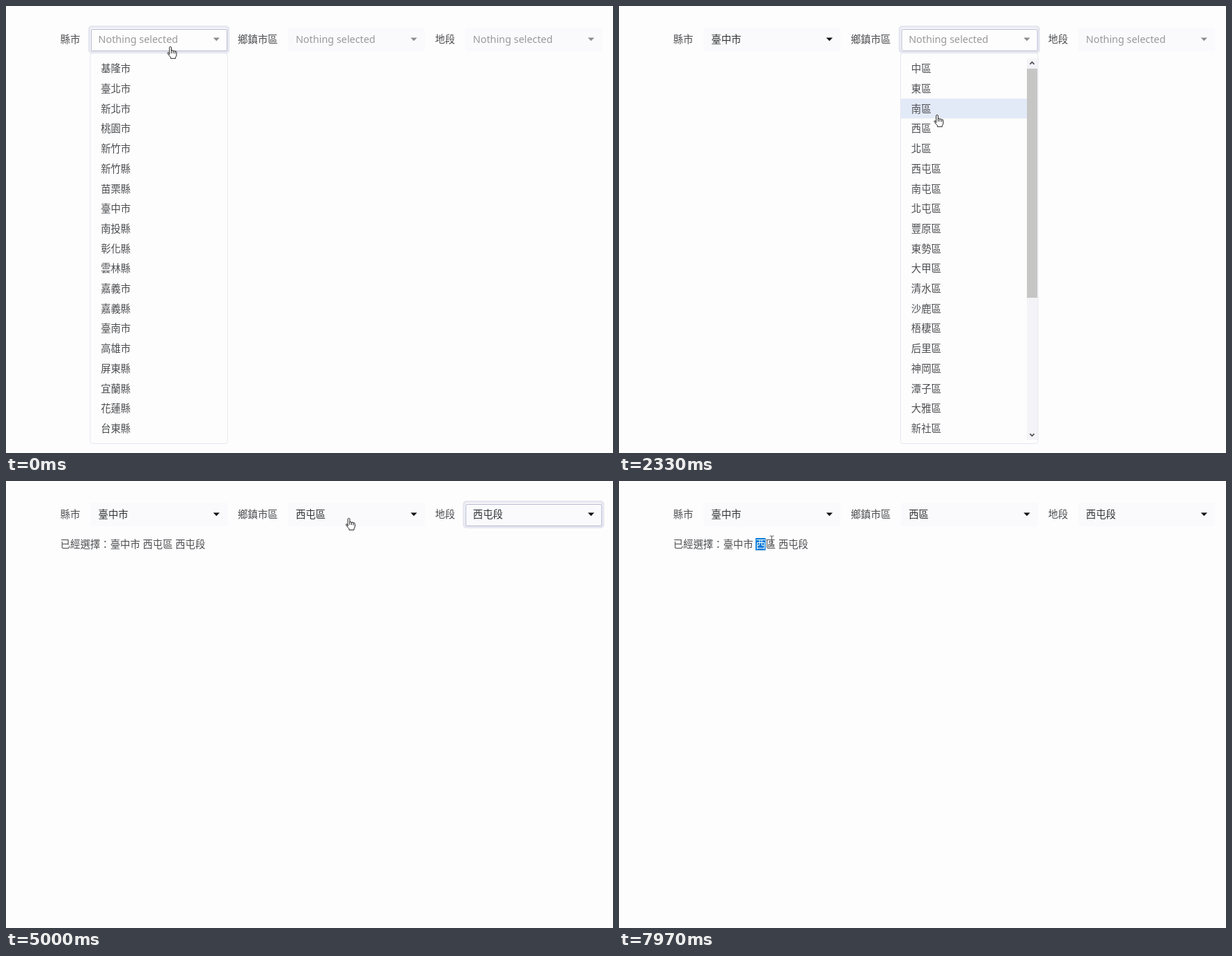
An HTML page that plays this animation: 872x642 px, repeating every 8000 ms.

```html
<!DOCTYPE html>
<html lang="zh-Hant">
<head>
<meta charset="utf-8">
<title>Linked selects</title>
<style>
html, body { margin: 0; width: 100%; height: 100%; overflow: hidden; background: #fdfdfd; }
svg { display: block; width: 872px; height: 642px; }
text { font: 350 14.35px "Noto Sans CJK TC", "Noto Sans CJK", "Noto Sans", sans-serif; fill: #4c4d50; white-space: pre; }
.value { font-family: "Noto Sans", "Noto Sans CJK TC", "Noto Sans CJK", sans-serif; font-weight: 400; }
.result { font-family: "Noto Sans", "Noto Sans CJK TC", "Noto Sans CJK", sans-serif; }
</style>
</head>
<body>
<svg id="stage" viewBox="0 0 872 642" xmlns="http://www.w3.org/2000/svg"></svg>
<script>
const LOOP = 8000, ROW = 28.7, TOP = 75.5, WIDTH = 197.3;
const stage = document.getElementById('stage');

function add(parent, tag, attrs, content) {
  const el = document.createElementNS('http://www.w3.org/2000/svg', tag);
  set(el, attrs);
  if (content) el.textContent = content;
  parent.appendChild(el);
  return el;
}
function set(el, attrs) {
  for (const k in attrs) el.setAttribute(k, attrs[k]);
}
const show = (el, on) => el.setAttribute('visibility', on ? 'visible' : 'hidden');
const within = (t, spans) => spans.some(([a, b]) => t >= a && t < b);
const clamp = v => Math.max(0, Math.min(1, v));
// latest value whose start time has passed
const latest = (t, steps) => steps.reduce((v, s) => t >= s[0] ? s[1] : v, null);

// open: menu visible, focus: ring shown, busy: disabled while loading
const fields = [
  {
    x: 121, label: '縣市', labelX: 78,
    items: '基隆市 臺北市 新北市 桃園市 新竹市 新竹縣 苗栗縣 臺中市 南投縣 彰化縣 雲林縣 嘉義市 嘉義縣 臺南市 高雄市 屏東縣 宜蘭縣 花蓮縣 台東縣',
    picks: [[900, 7]], press: [[840, 900]], open: [[0, 900]],
    focus: [[-200, 1720]], busy: [[900, 1400]]
  },
  {
    x: 404.6, label: '鄉鎮市區', labelX: 333, thumb: 329,
    items: '中區 東區 南區 西區 北區 西屯區 南屯區 北屯區 豐原區 東勢區 大甲區 清水區 沙鹿區 梧棲區 后里區 神岡區 潭子區 大雅區 新社區',
    picks: [[3040, 5], [6900, 3]], press: [[2970, 3040], [6800, 6900]],
    open: [[1820, 3040], [5740, 6900]],
    focus: [[1720, 3480], [5670, 7640]], busy: [[3040, 3350]]
  },
  {
    x: 659.2, label: '地段', labelX: 616.5, thumb: 181,
    items: '西屯段 下石碑段 上石碑段 惠來厝段 何厝段 福安段 中和段 中義段 中正段 中仁段 協和段 大明段 大墩段 何安段 永安段 順安段 信安段 民安段 國安段',
    picks: [[3960, 0]], press: [[3880, 3960]], open: [[3580, 3960]],
    focus: [[3480, 5670]], busy: []
  }
];

function buildField(f) {
  f.items = f.items.split(' ');
  add(stage, 'text', { x: f.labelX, y: 53.4 }, f.label);
  f.ring = add(stage, 'rect', { x: f.x - 2.9, y: 28.3, width: WIDTH + 5.8, height: 39.6, rx: 5, fill: '#e6e6f0' });
  f.button = add(stage, 'rect', { x: f.x, y: 31.2, width: WIDTH, height: 34, rx: 3.4 });
  f.outline = add(stage, 'rect', { x: f.x + 1.5, y: 33.5, width: WIDTH - 2.3, height: 31, rx: 1.5, fill: 'none', stroke: '#b6b8cf' });
  f.value = add(stage, 'text', { x: f.x + 11.6, y: 53.4, class: 'value' });
  f.caret = add(stage, 'path', { d: `M${f.x + 176.7} 45.6h9.2l-4.6 4.6z` });
}

function chevron(parent, x, y, dir) {
  add(parent, 'path', { d: `M${x - 3} ${y + 1.7 * dir}l3 ${-3.2 * dir}l3 ${3.2 * dir}`, fill: 'none', stroke: '#505050', 'stroke-width': 1.7 });
}

function buildMenu(f) {
  const g = f.menu = add(stage, 'g', {});
  add(g, 'rect', { x: f.x, y: 67.8, width: WIDTH, height: 560.7, rx: 3.6, fill: '#fdfdfd', stroke: '#e2e2f0', 'stroke-width': .9 });
  const inner = f.thumb ? 181 : WIDTH - 1;
  f.rows = f.items.map((name, i) => {
    const y = TOP + i * ROW;
    return {
      back: add(g, 'rect', { x: f.x + .4, y, width: inner, height: ROW }),
      text: add(g, 'text', { x: f.x + 15.2, y: y + 19.8 }, name)
    };
  });
  if (f.thumb) {
    const x = f.x + 181.4;
    add(g, 'rect', { x, y: TOP, width: 15, height: 547.5, fill: '#f3f3f8' });
    add(g, 'rect', { x, y: 90, width: 15, height: f.thumb, fill: '#c6c6c4' });
    chevron(g, x + 7.4, 82, 1);
    chevron(g, x + 7.4, 616, -1);
  }
}

fields.forEach(buildField);
const resultMark = add(stage, 'rect', { x: 196.2, y: 82, width: 14.4, height: 17.5, fill: '#0078d7' });
const result = add(stage, 'text', { x: 78, y: 95.6, class: 'result' });
const resultParts = [0, 1, 2].map(() => add(result, 'tspan', {}));
fields.forEach(buildMenu);

const tip = add(stage, 'g', {});
add(tip, 'rect', { x: 493.5, y: 71.5, width: 39, height: 18, fill: '#fff', stroke: '#8a8a8a' });
add(tip, 'text', { x: 496.9, y: 84.6, style: 'font-size:10.8px;fill:#575757' }, '西屯區');

// each pointer is drawn with its hot spot at 0,0
const pen = { fill: '#fff', stroke: '#222', 'stroke-width': 1, 'stroke-linejoin': 'round', 'stroke-linecap': 'round' };
const pointers = {
  arrow: add(stage, 'path', { ...pen, d: 'M0 0V12.2L2.8 9.7L4.8 14L6.7 13.1L4.8 9H8.6Z' }),
  hand: add(stage, 'path', {
    ...pen,
    d: 'M-1.4 10.6V1.2Q-1.4 0 0 0T1.4 1.2V6Q1.6 4.9 2.8 5.1T4 6.4Q4.4 5.4 5.5 5.7T6.6 7Q7 6.3 7.9 6.6T8.8 8V11.5Q8.8 13.6 7.4 15V16.8H.4V15.2Q-1.6 13.2-3.6 10.2Q-4.6 8.7-3.6 8.2T-1.4 10.6ZM1.4 6V9.2M4 6.6V9.2M6.6 7.2V9.6'
  }),
  beam: add(stage, 'path', { ...pen, fill: 'none', stroke: '#555', d: 'M-2.5-6.5H-1Q0-6.5 0-5.5Q0-6.5 1-6.5H2.5M0-5.5V5.5M-2.5 6.5H-1Q0 6.5 0 5.5Q0 6.5 1 6.5H2.5' })
};

// time, x, y of the pointer's hot spot
const path = [
  [0, 236.2, 58.5], [60, 236.2, 59.5], [520, 238, 210], [830, 233, 277], [1200, 233, 276.5],
  [1680, 472, 50], [1830, 472, 52], [2330, 457, 156.5], [2500, 457, 156.5],
  [2770, 455, 238], [2980, 455, 238], [3440, 738, 50], [3570, 738, 52],
  [3770, 718.5, 80.5], [3860, 716, 87], [3970, 716, 87], [4600, 489, 55], [4670, 489, 55],
  [4700, 492.5, 53.5], [6060, 492.5, 53.5], [6600, 466, 173.5], [6920, 466, 173.5],
  [7420, 186, 92], [7600, 197, 90], [7640, 197, 90], [7800, 212, 87], [7940, 212, 87], [7970, 219.5, 85.5]
];
const shapes = [
  [0, 'hand'], [900, 'arrow'], [1520, 'hand'], [3040, 'arrow'], [3270, 'hand'],
  [3700, 'arrow'], [3800, 'hand'], [3960, 'arrow'], [4400, 'hand'], [6900, 'arrow'], [7300, 'beam']
];

function pointerAt(t) {
  const i = path.findIndex(k => k[0] > t);
  if (i < 0) return path[path.length - 1].slice(1);
  const a = path[i - 1], b = path[i];
  const u = (t - a[0]) / (b[0] - a[0]), e = u * u * (3 - 2 * u);
  return [a[1] + (b[1] - a[1]) * e, a[2] + (b[2] - a[2]) * e];
}

function drawField(f, t, px, py) {
  const picked = latest(t, f.picks);
  const open = within(t, f.open), busy = within(t, f.busy), focus = within(t, f.focus);
  const glow = Math.max(...f.focus.map(([a, b]) => Math.min(clamp((t - a) / 150), clamp(1 - (t - b) / 150))));
  const empty = picked === null;
  f.ring.setAttribute('opacity', busy ? 0 : glow);
  f.button.setAttribute('fill', open ? '#fdfdfe' : '#fafafd');
  f.outline.setAttribute('opacity', focus ? (t > 5670 ? .4 : 1) : 0);
  f.value.textContent = empty ? 'Nothing selected' : f.items[picked];
  f.value.style.fill = empty || busy ? '#999' : '#303235';
  f.caret.setAttribute('fill', empty || busy ? '#8c8c8c' : '#111');

  show(f.menu, open);
  if (!open) return;
  const over = px > f.x && px < f.x + 182 ? Math.floor((py - TOP) / ROW) : -1;
  const pressed = within(t, f.press);
  f.rows.forEach(({ back, text }, i) => {
    const active = i === picked || (pressed && i === over);
    back.setAttribute('fill', active ? '#0a6efd' : i === over ? '#e3eaf7' : 'none');
    text.style.fill = active ? '#fff' : '';
  });
}

function draw(t) {
  const [px, py] = pointerAt(t);
  fields.forEach(f => drawField(f, t, px, py));

  const [city, area, plot] = fields.map(f => f.items[latest(t, f.picks)]);
  const marked = t >= 7700;
  show(result, t >= 3960);
  show(resultMark, marked);
  resultParts[0].textContent = `已經選擇：${city} `;
  resultParts[1].textContent = area ? area[0] : '';
  resultParts[1].style.fill = marked ? '#fff' : '';
  resultParts[2].textContent = area ? `${area.slice(1)} ${plot}` : '';

  show(tip, t >= 5230 && t < 5670);
  tip.setAttribute('opacity', t < 5270 ? .5 : 1);

  const shape = latest(t, shapes);
  for (const name in pointers) show(pointers[name], name === shape);
  pointers[shape].setAttribute('transform', `translate(${px} ${py})`);
}

const start = performance.now();
function tick() {
  draw((performance.now() - start) % LOOP);
  requestAnimationFrame(tick);
}
tick();
</script>
</body>
</html>
```
